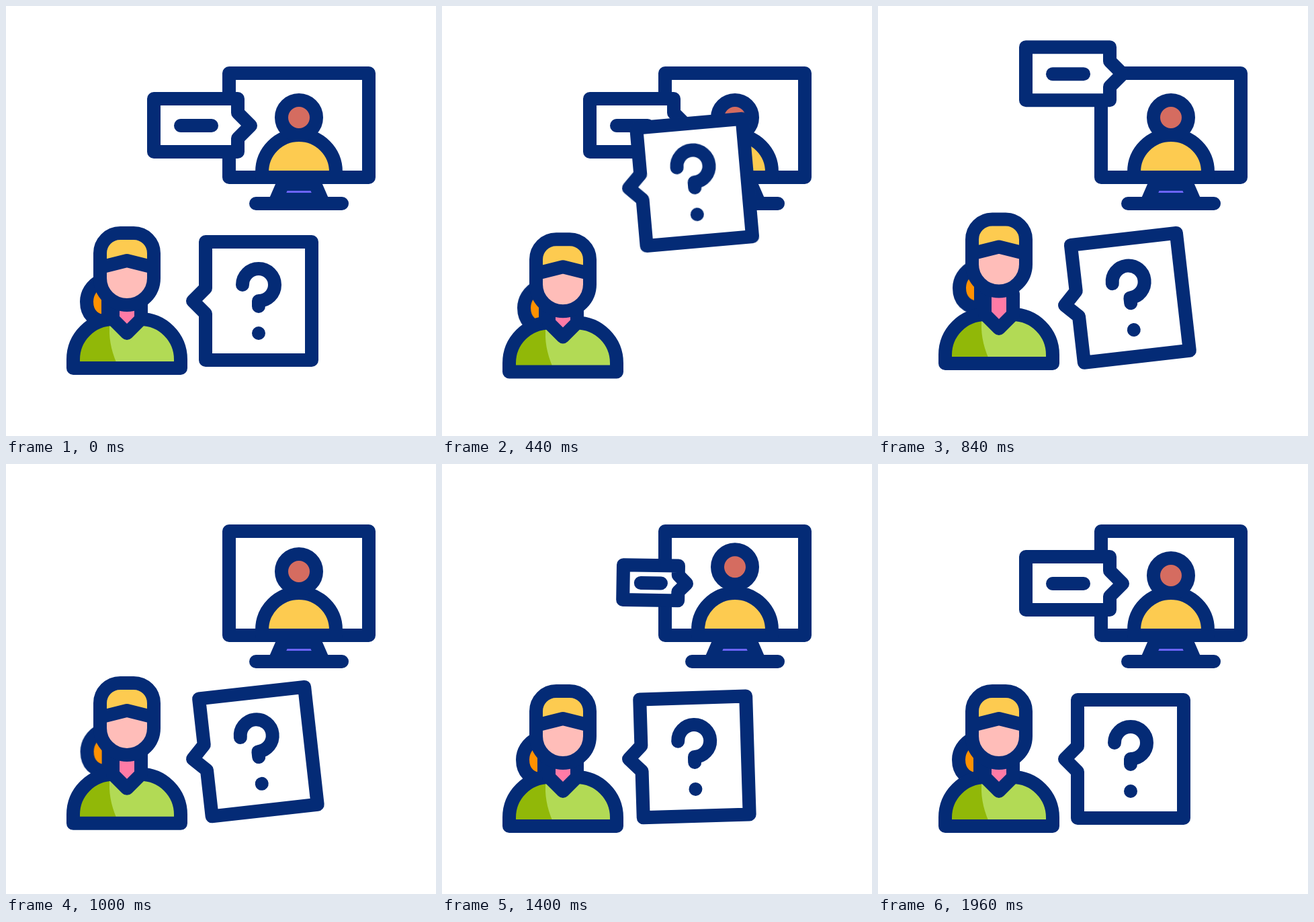
Write an HTML page that moves like this. It is 640 px wide and 640 px high and loops after 2.16 s.

```html
<!DOCTYPE html>
<html lang="en">
<head>
<meta charset="utf-8">
<title>Question and answer</title>
<style>
  html, body { margin: 0; width: 100%; height: 100%; overflow: hidden; background: #fff; }
  svg { display: block; width: 100vw; height: 100vh; }

  .line { stroke: #042b76; stroke-width: 20; stroke-linecap: round; stroke-linejoin: round; fill: none; }
  .white { fill: #fff; }
  .yellow { fill: #fdcb50; }
  .red { fill: #d56c60; }
  .purple { fill: #6c64fb; }
  .skin { fill: #ffbdb9; }
  .neck { fill: #ff7ba6; }
  .orange { fill: #ff9100; }
  .green { fill: #b2da55; }
  .shade { fill: #91b808; }

  .move { animation: 2160ms ease-in-out infinite; }
  #body { animation-name: body; }
  #head { animation-name: head; }
  #tail { animation-name: head, sway; }
  #caller { animation-name: caller; }
  #question { transform-origin: 278px 439px; animation-name: toss, tilt; }
  #answer { transform-origin: 364px 178px; animation-name: fly, grow, swing; }
  #answer path { vector-effect: non-scaling-stroke; }

  @keyframes body {
    0%, 3.7% { translate: 0 0; }
    12.96% { translate: 0 8px; animation-timing-function: ease-in; }
    27.78% { translate: 0 0; animation-timing-function: ease-out; }
    38.89% { translate: 0 -7px; }
    55.56%, 100% { translate: 0 0; }
  }
  @keyframes head {
    0%, 3.7% { translate: 0 0; }
    12.96% { translate: 0 11.7px; animation-timing-function: ease-in; }
    27.78% { translate: 0 3.8px; animation-timing-function: ease-out; }
    38.89% { translate: 0 -20.5px; }
    55.56%, 100% { translate: 0 0; }
  }
  @keyframes sway {
    0%, 3.7% { transform: none; }
    12.96% { transform: translateX(1px); }
    27.78% { transform: translateX(3px); }
    38.89% { transform: translateX(1px); }
    55.56%, 100% { transform: none; }
  }
  @keyframes toss {
    0%, 3.7% { translate: 0 0; }
    10.19% { translate: 0 29px; animation-timing-function: ease-in; }
    12.96% { translate: 0 22.5px; }
    20.37% { translate: 0 -168px; animation-timing-function: cubic-bezier(.33, 0, .67, .33); }
    27.78% { translate: 0 -6.2px; animation-timing-function: ease-out; }
    31.48% { translate: 0 21px; }
    38.89% { translate: 0 6.5px; animation-timing-function: ease-out; }
    44.44%, 100% { translate: 0 0; }
  }
  @keyframes tilt {
    0%, 3.7% { rotate: 0deg; }
    10.19% { rotate: 8deg; animation-timing-function: ease-in; }
    12.96% { rotate: 1.6deg; animation-timing-function: ease-out; }
    20.37% { rotate: -5deg; animation-timing-function: ease-out; }
    27.78% { rotate: -8deg; }
    38.89% { rotate: -6.5deg; }
    55.56% { rotate: -6.2deg; }
    70.37%, 100% { rotate: 0deg; }
  }
  @keyframes fly {
    0%, 29.63% { translate: 0 0; animation-timing-function: cubic-bezier(.33, 0, .67, .33); }
    46.3%, 48.14% { translate: 0 -248px; animation-timing-function: step-end; }
    48.15%, 100% { translate: 0 0; }
  }
  @keyframes grow {
    0%, 48.14% { scale: 1; animation-timing-function: step-end; }
    48.15% { scale: .02; animation-timing-function: linear; }
    55.56% { scale: .385; animation-timing-function: linear; }
    72.22% { scale: .87; animation-timing-function: ease-out; }
    79.63%, 100% { scale: 1; }
  }
  @keyframes swing {
    0%, 48.14% { rotate: 0deg; animation-timing-function: step-end; }
    48.15% { rotate: -22deg; animation-timing-function: ease-in; }
    55.56% { rotate: -17.5deg; }
    72.22% { rotate: 13.2deg; animation-timing-function: ease-out; }
    75.93% { rotate: 15deg; }
    79.63% { rotate: 13deg; }
    90.74%, 100% { rotate: 0deg; }
  }
  @keyframes caller {
    0%, 39.81% { translate: 0 0; }
    55.56% { translate: 0 -16.7px; }
    83.33%, 100% { translate: 0 0; }
  }
</style>
</head>
<body>
<svg viewBox="0 0 640 640">
  <g id="monitor">
    <path class="line purple" d="M412 265L402 288H470L460 265Z"/>
    <path class="line" d="M372 294H500"/>
    <path class="line white" d="M332 100H540V255H332Z"/>
    <path class="line yellow" d="M381 255V247A55 55 0 0 1 491 247V255Z"/>
    <circle id="caller" class="line red move" cx="436" cy="166" r="26"/>
  </g>

  <g id="answer" class="move">
    <path class="line white" d="M220 138H345V159L364 178L345 197V217H220Z"/>
    <path class="line" d="M260 178H306"/>
  </g>

  <g id="woman">
    <path id="tail" class="line orange move" d="M142 408C126 416 120 429 120 440C120 458 130 470 152 470V408Z"/>
    <g id="body" class="move">
      <path class="green" d="M100 539V526A60 60 0 0 1 160 466H200A60 60 0 0 1 260 526V539Z"/>
      <path class="shade" d="M100 539V526A60 60 0 0 1 154 466V480Q153 508 168 539Z"/>
      <path class="line" d="M100 539V526A60 60 0 0 1 160 466H200A60 60 0 0 1 260 526V539Z"/>
      <path class="line neck" d="M159 435V466L180 487L201 466V435"/>
    </g>
    <g id="head" class="move">
      <path class="skin" d="M140 388V405A40 40 0 0 0 220 405V388L180 379Z"/>
      <path class="yellow" d="M140 388V368A30 30 0 0 1 170 338H190A30 30 0 0 1 220 368V388L180 379Z"/>
      <path class="line" d="M140 389L180 379L220 389"/>
      <path class="line" d="M140 405V368A30 30 0 0 1 170 338H190A30 30 0 0 1 220 368V405A40 40 0 0 1 140 405Z"/>
    </g>
  </g>

  <g id="question" class="move">
    <path class="line white" d="M297 351H455V527H297V458L278 439L297 420Z"/>
    <path class="line" d="M352 415A24 24 0 1 1 376 439V447M376 487v.01"/>
  </g>
</svg>
</body>
</html>
```
